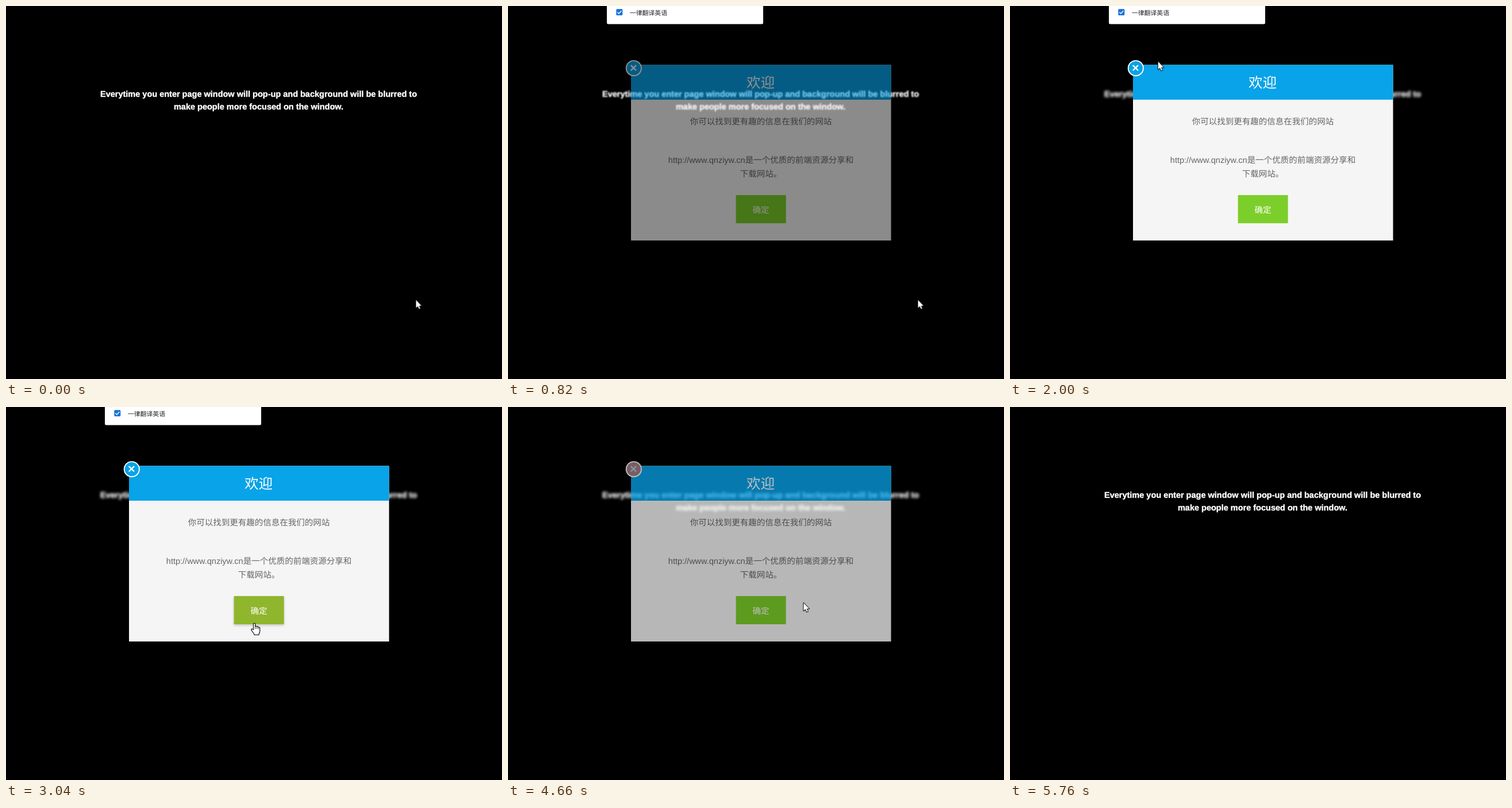
Animation, 863 px wide and 649 px high, one loop 5900 ms. Source, as an HTML page:

```html
<!DOCTYPE html>
<html lang="zh-CN">
<head>
<meta charset="utf-8">
<title>Pop-up window</title>
<style>
  html, body { margin: 0; width: 100%; height: 100%; overflow: hidden; background: #000; }
  svg { display: block; width: 863px; height: 649px; }
  text {
    font: 14.5px "Liberation Sans", "Noto Sans CJK SC", "Noto Sans CJK", sans-serif;
    text-anchor: middle;
    text-rendering: geometricPrecision;
  }

  .page, .popup, .popup *, .translate, .status, .cursor, .cursor * {
    animation: 5.9s linear infinite;
  }

  .page { fill: #fff; stroke: #fff; stroke-width: .4; animation-name: blur; }
  .page text { font-weight: bold; }
  .translate { animation-name: translate; animation-timing-function: step-end; }
  .translate text { font-size: 10.9px; fill: #222; text-anchor: start; }
  .status { fill: #fff; animation-name: status; animation-timing-function: step-end; }

  .popup { animation-name: fade; animation-timing-function: cubic-bezier(.37, 0, .63, 1); }
  .popup text { fill: #666; }
  .popup .title { font-size: 24.6px; fill: #fff; }
  .popup .label { fill: #fff; }
  .popup .button { animation-name: button; }
  .popup .disc { stroke: #fff; stroke-width: 1.9; animation-name: disc; }
  .popup .cross { stroke-width: 2.3; fill: none; animation-name: cross; }

  .cursor { animation-name: move; }
  .cursor path { fill: #fff; stroke: #000; stroke-linejoin: round; }
  .cursor .arrow { paint-order: stroke; animation-name: arrow; animation-timing-function: step-end; }
  .cursor .hand { animation-name: hand; animation-timing-function: step-end; }

  @keyframes blur {
    0%, 5.6% { filter: none; }
    20.85%, 84.7% { filter: blur(2.1px); }
    96%, 100% { filter: none; }
  }
  @keyframes fade {
    0%, 5.6% { opacity: 0; }
    20.85%, 73.9% { opacity: 1; }
    89.15%, 100% { opacity: 0; }
  }
  @keyframes translate {
    0% { opacity: 0; }
    10.5% { opacity: 1; }
    74.3%, 100% { opacity: 0; }
  }
  @keyframes status {
    0% { opacity: 0; }
    36.3% { opacity: 1; }
    40% { opacity: 0; }
    54.5% { opacity: 1; }
    61% { opacity: 0; }
    70.3% { opacity: 1; }
    74.6%, 100% { opacity: 0; }
  }
  @keyframes button {
    0%, 50.4% { fill: #7ccf2a; filter: drop-shadow(0 2px 2px rgba(0, 0, 0, 0)); }
    51.5%, 52.7% { fill: #8fb62d; filter: drop-shadow(0 2px 2px rgba(0, 0, 0, .2)); }
    54.5%, 60.5% { fill: #94b02e; filter: drop-shadow(0 2px 2px rgba(0, 0, 0, .25)); }
    65%, 100% { fill: #7ccf2a; filter: drop-shadow(0 2px 2px rgba(0, 0, 0, 0)); }
  }
  @keyframes disc {
    0%, 35.6% { fill: #08a3e8; }
    38%, 39.5% { fill: #cf6e68; }
    43%, 69.3% { fill: #08a3e8; }
    71.6%, 75% { fill: #cf6e68; }
    78.98%, 80.1% { fill: #a47d82; }
    84%, 100% { fill: #08a3e8; }
  }
  @keyframes cross {
    0%, 75% { stroke: #fff; }
    78.98%, 80.1% { stroke: #a2cde6; }
    84%, 100% { stroke: #fff; }
  }
  @keyframes arrow {
    0% { opacity: 1; }
    36% { opacity: 0; }
    39.5% { opacity: 1; }
    51.4% { opacity: 0; }
    60.5% { opacity: 1; }
    69.5% { opacity: 0; }
    74.3% { opacity: 1; }
    96.6%, 100% { opacity: 0; }
  }
  @keyframes hand {
    0% { opacity: 0; }
    36% { opacity: 1; }
    39.5% { opacity: 0; }
    51.4% { opacity: 1; }
    60.5% { opacity: 0; }
    69.5% { opacity: 1; }
    74.3%, 100% { opacity: 0; }
  }
  @keyframes move {
    0%, 24.2% { transform: translate(713.4px, 511.6px); }
    25.6% { transform: translate(702px, 500px); }
    29% { transform: translate(560px, 330px); }
    32% { transform: translate(330px, 140px); }
    33.8%, 35% { transform: translate(257.8px, 96.8px); }
    36.3% { transform: translate(219px, 110px); }
    38.9% { transform: translate(219px, 112px); }
    42% { transform: translate(300px, 230px); }
    45% { transform: translate(400px, 360px); }
    48% { transform: translate(450px, 400px); }
    50.5% { transform: translate(437px, 384px); }
    51.5%, 52.7% { transform: translate(432px, 376px); }
    54% { transform: translate(436px, 358px); }
    57.5% { transform: translate(438px, 352px); }
    61% { transform: translate(420px, 320px); }
    65% { transform: translate(330px, 215px); }
    69% { transform: translate(235px, 125px); }
    71%, 73.9% { transform: translate(220px, 112.5px); }
    76% { transform: translate(330px, 190px); }
    78.9%, 80.1% { transform: translate(514.4px, 341px); }
    84% { transform: translate(700px, 470px); }
    89.2% { transform: translate(772px, 540px); }
    95.5%, 100% { transform: translate(790px, 622px); }
  }
</style>
</head>
<body>
<svg viewBox="0 0 863 649">
  <g class="page">
    <text x="439.5" y="158">Everytime you enter page window will pop-up and background will be blurred to</text>
    <text x="439.5" y="179.7">make people more focused on the window.</text>
  </g>

  <g class="popup">
    <rect x="214" y="102.5" width="452.5" height="305.5" fill="#f5f5f5"/>
    <rect x="214" y="102.5" width="452.5" height="60.5" fill="#08a3e8"/>
    <text class="title" x="439.6" y="141.5">欢迎</text>
    <text x="440" y="205.5">你可以找到更有趣的信息在我们的网站</text>
    <text x="440" y="273">http://www.qnziyw.cn是一个优质的前端资源分享和</text>
    <text x="440" y="296.5">下载网站。</text>
    <rect class="button" x="396.6" y="329" width="87" height="49"/>
    <text class="label" x="440" y="359.5">确定</text>
    <circle class="disc" cx="218.8" cy="108.2" r="13.1"/>
    <path class="cross" d="M213.8 103.1l9.2 9.2m0-9.2l-9.2 9.2"/>
  </g>

  <g class="translate">
    <rect x="172" y="-6" width="272" height="37.5" rx="2.5" fill="#fff"/>
    <rect x="188.3" y="5.3" width="11" height="11" rx="1.5" fill="#1a73d9"/>
    <path d="M190.4 10.8l2.4 2.4 4.5-4.7" fill="none" stroke="#fff" stroke-width="1.4"/>
    <text x="211.8" y="15.6">一律翻译英语</text>
  </g>

  <rect class="status" y="648" width="176" height="1"/>

  <g class="cursor">
    <path class="arrow" stroke-width="1.8" d="M0 0V13.6L3.1 10.8L5.3 15.5L7.3 14.6L5.2 10H9.4Z"/>
    <g class="hand">
      <path stroke-width="1.1" d="M-1.6 11.5V1.6Q-1.6 .2 0 .2T1.6 1.6V6.2Q1.8 5 3 5T4.6 6.5Q5 5.6 6.1 5.8T7.4 7.4Q7.8 6.8 8.7 7T9.7 8.6V14Q9.7 17 8 18.6V20.5H-.2V19L-5 12.4Q-5.8 10.8-4.6 10.2T-2.6 10.9Z"/>
      <path stroke-width=".9" style="fill:none" d="M1.6 6V10M4.6 6.5V10M7.4 7.4V10.4"/>
    </g>
  </g>
</svg>
</body>
</html>
```
